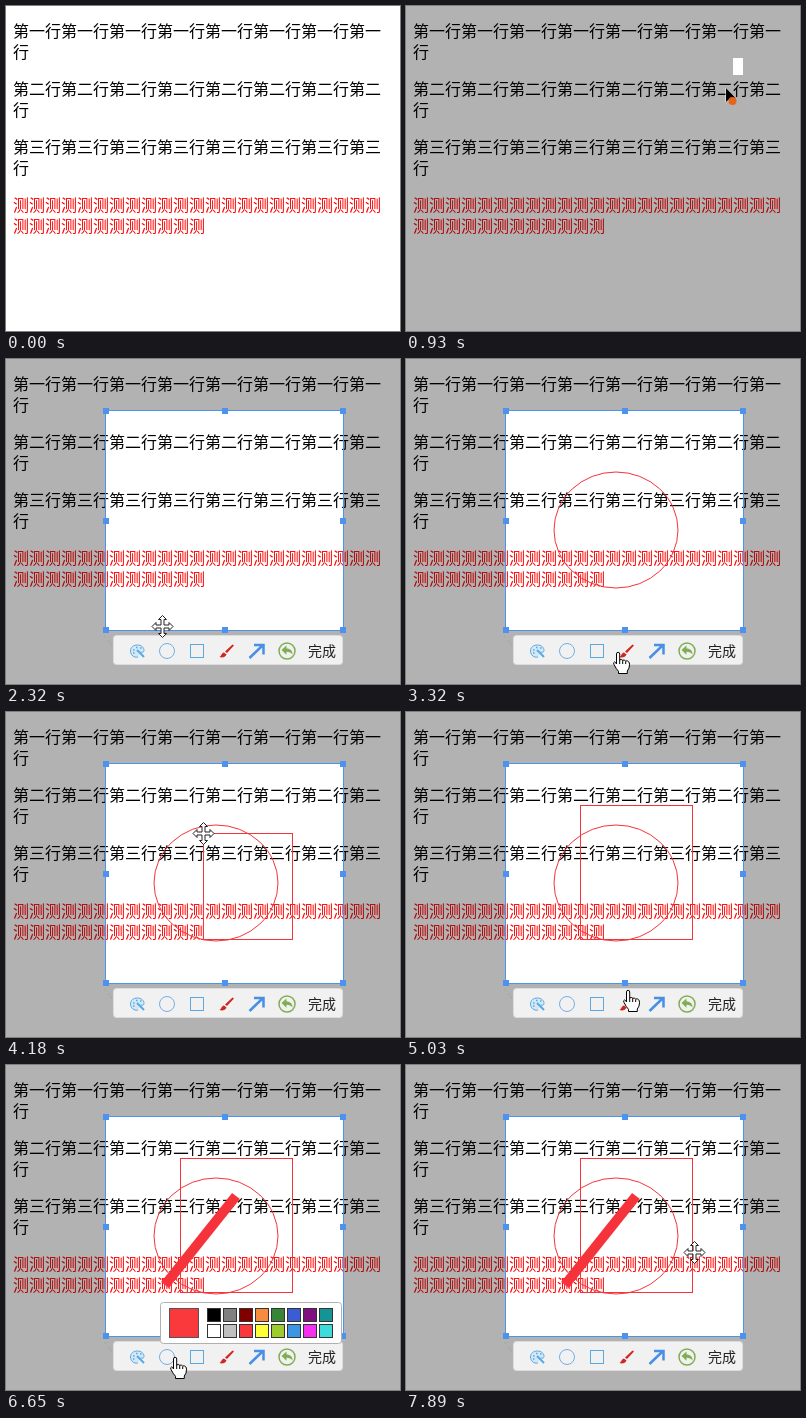
An HTML page for the animation above (7.99 s loop, 394 by 325 pixels).

```html
<!DOCTYPE html>
<html lang="zh-CN">
<head>
<meta charset="utf-8">
<title>Screen capture demo</title>
<style>
html, body { margin: 0; width: 100%; height: 100%; overflow: hidden; background: #fff; }
svg { display: block; width: 394px; height: 325px; }
text { font-family: "Noto Sans CJK SC", "Noto Sans CJK", sans-serif; }
</style>
</head>
<body>
<svg viewBox="0 0 394 325">
  <rect width="394" height="325" fill="#fff"/>
  <g id="page" font-size="16"></g>
  <path id="dim" fill="#000" fill-opacity=".3" fill-rule="evenodd"/>
  <g fill="none" stroke="#f5333a">
    <ellipse id="oval"/>
    <rect id="box"/>
    <line id="brush" stroke-width="10"/>
  </g>
  <g id="frame">
    <rect x="99.5" y="51.5" width="238" height="220" fill="none" stroke="#4d92ee"/>
    <g id="handles" fill="#4d92ee"></g>
  </g>
  <g id="toolbar">
    <path d="M98 277l2 2M103 281v3M106 285l-2 1" stroke="#93b58b" fill="none"/>
    <rect x="107.5" y="276.5" width="229" height="29" rx="3" fill="#f1f1f1" stroke="#dcdcdc"/>
    <g fill="none" stroke="#5aa9e2">
      <path d="M132 298c-4 1-7.500-2-7.500-6s3-6 7-6 6.500 2.500 6.500 5.500c0 2-2 2-3.500 1.500" fill="#d3e8f6"/>
      <path d="M131 291l7 7" stroke-width="2"/>
      <path d="M127 291h1.500M130 288.500h1.500M134 289h1.500M127 294h1.500" stroke-width="1.500"/>
      <circle cx="161" cy="292" r="7.500" stroke="#74aee9"/>
      <rect x="184.500" y="285.500" width="13" height="13"/>
    </g>
    <path d="M226.500 285.500l1.500 1-7 7.500-2-1.500zM218 293.500l2.500 2c-1 2.500-4 3.500-7 2.500 2-1 2-4 4.500-4.500z" fill="#d0261f"/>
    <path d="M243.500 299L256 287M248 286h9.500v9.500" fill="none" stroke="#4a8fe6" stroke-width="2.500"/>
    <circle cx="281" cy="292" r="8" fill="none" stroke="#7fae52" stroke-width="1.500"/>
    <path d="M275.500 291l5-4.500v3c4 0 6 2.500 6 6-1.500-2-3-2.800-6-2.800v3z" fill="#7fae52"/>
    <text x="302" y="297" font-size="14" fill="#222">完成</text>
  </g>
  <g id="popup">
    <rect x="154.500" y="237.500" width="181" height="41" rx="3" fill="#fff" stroke="#b0b0b0"/>
    <rect id="current" x="163.500" y="243.500" width="29" height="29" stroke="#555"/>
    <g id="swatches" stroke="#333"></g>
  </g>
  <g id="arrow">
    <path d="M0 0v14l3.300-3 2.200 5 2.200-1-2.200-4.800h4.500z" fill="#000" stroke="#fff" paint-order="stroke"/>
    <circle cx="6.500" cy="13" r="4" fill="#e8641b"/>
  </g>
  <path id="move" fill="#fff" stroke="#222" stroke-linejoin="round"
    d="M.5-10.500l4 4h-2.500v5.500h5v-2.500l4 4-4 4v-2.500h-5v5.500h2.500l-4 4-4-4h2.500v-5.500h-5v2.500l-4-4 4-4v2.500h5v-5.500h-2.500z"/>
  <g id="hand">
    <path fill="#fff" stroke="#000" stroke-linejoin="round"
      d="M-1.500 12V2q0-1.700 1.600-1.700T1.700 2v6q1.500-1.300 3 .3 1.700-.8 2.800.7 2-.7 3.200.8.800.7.800 3 0 3.700-2.200 6.200v2.500h-8.800v-2.200q-2.300-2.300-4.500-6.800-1-2.200.5-2.500 1-.1 2 2z"/>
    <path d="M1.700 8v4M4.700 8.500V12M7.700 9.500V12" stroke="#000" fill="none"/>
  </g>
</svg>
<script>
const LOOP = 7990, STEP = 77.3, LAG = 17, LAST = 102;
const el = id => document.getElementById(id);

function set(node, attrs) {
  for (const name in attrs) node.setAttribute(name, attrs[name]);
}
function add(parent, tag, attrs, text = "") {
  const node = document.createElementNS("http://www.w3.org/2000/svg", tag);
  node.textContent = text;
  set(node, attrs);
  el(parent).append(node);
}
function show(id, on) {
  el(id).style.display = on ? "" : "none";
}

// Page text, 23 characters to a line
function paragraph(row, text, fill) {
  [text.slice(0, 23), text.slice(23)].forEach((line, i) =>
    add("page", "text", { x: 7, y: 31 + 58 * row + 21 * i, fill }, line));
}
["一", "二", "三"].forEach((n, row) => paragraph(row, `第${n}行`.repeat(8), "#000"));
paragraph(3, "测".repeat(35), "#f00");

for (const i of [0, 1, 2])
  for (const j of [0, 1, 2])
    if (i !== 1 || j !== 1)
      add("handles", "rect", { x: Math.round(97 + 118.5 * i), y: Math.floor(49 + 109.5 * j) + (j === 1), width: 6, height: 6 });

const colors = ("#000 #808080 #800000 #f78b3e #388538 #3a5dd6 #80107f #149494 " +
  "#fff #c0c0c0 #f9393c #ffff38 #9ccc2e #3d95e6 #f52ff0 #3ddbdb").split(" ");
colors.forEach((fill, i) => add("swatches", "rect", {
  x: 201.5 + 16 * (i % 8), y: 243.5 + 16 * (i >> 3), width: 13, height: 13, fill
}));

// What the pointer drags out; start and end count steps
const marks = {
  area: { from: [337, 52], to: [100, 271], start: 10, end: 20 },
  oval: { from: [148, 113], to: [272, 229], start: 34, end: 38 },
  box: { from: [287, 228], to: [174, 93], start: 51, end: 55 },
  brush: { from: [159, 220], to: [230, 131], start: 67, end: 70 }
};
const tool = (i, dx = 0, dy = 0) => [131 + 30 * i + dx, 292 + dy];

// Pointer stops: arrive at a point, rest there until a later step
const stops = [];
const go = (at, point, until = at) => stops.push({ at, point, until });
const press = ({ from, start }, at = start) => go(at, from, start);
const release = ({ to, end }, until = end) => go(end, to, until);

go(1, [313, 306]);
go(3, [301, 186], 4);
press(marks.area, 8);
go(12, [320, 82]);
release(marks.area, 21);
go(27, tool(1, -5), 29);
go(30, [156, 267]);
press(marks.oval, 33);
release(marks.oval);
go(43, [212, 293]);
go(46, tool(2, -3, 4), 47);
press(marks.box, 50);
release(marks.box, 57);
go(63, tool(3), 64);
go(65, [222, 278]);
press(marks.brush);
release(marks.brush, 71);
go(76, tool(4, 7));
go(81, tool(0, -6, 10));
go(83, tool(0), 84);
go(86, tool(1, 8));
go(94, [299, 279]);
go(96, [299, 266], 98);
go(LAST, [288, 187]);

// Glides slow down slightly towards each stop
function pos(k) {
  const i = Math.max(1, stops.findIndex(s => s.at >= k));
  const a = stops[i - 1], b = stops[i];
  const t = Math.min(1, Math.max(0, (k - a.until) / (b.at - a.until)));
  return a.point.map((v, n) => Math.round(v + (b.point[n] - v) * t ** 0.8));
}

// Extent of a mark at step k
function extent({ from, start, end }, k) {
  const [ax, ay] = from, [bx, by] = pos(Math.max(start, Math.min(k, end)));
  return { ax, ay, bx, by, x: Math.min(ax, bx), y: Math.min(ay, by),
    w: Math.abs(bx - ax), h: Math.abs(by - ay) };
}

function drawMarks(k) {
  // The clear area trails the pointer by one step
  const a = extent(marks.area, k - 1);
  const hole = k > marks.area.start ? `M${a.x} ${a.y}h${a.w}v${a.h}h${-a.w}z` : "";
  set(el("dim"), { d: "M0 0H394V325H0z" + hole });

  const o = extent(marks.oval, k);
  set(el("oval"), { cx: o.x + o.w / 2, cy: o.y + o.h / 2, rx: o.w / 2, ry: o.h / 2 });
  const r = extent(marks.box, k);
  set(el("box"), { x: r.x + .5, y: r.y + .5, width: Math.max(0, r.w - 1), height: Math.max(0, r.h - 1) });
  const s = extent(marks.brush, k);
  set(el("brush"), { x1: s.ax, y1: s.ay, x2: s.bx, y2: s.by });
  for (const id of ["oval", "box", "brush"]) show(id, k > marks[id].start);
}

function draw(time) {
  const k = Math.min(LAST, Math.floor((time + LAG) / STEP));
  const selected = k > marks.area.end;
  const open = k >= 84 && k < 99;
  drawMarks(k);
  show("dim", k >= 5);
  show("frame", selected);
  show("toolbar", selected);
  show("popup", open);
  set(el("current"), { fill: colors[k >= 96 ? 14 : 10] });

  const [x, y] = pos(k);
  const overTools = y >= 272 || open && y > 237;
  const kind = !selected ? "arrow" : overTools ? "hand" : "move";
  for (const id of ["arrow", "move", "hand"]) {
    show(id, k > 0 && id === kind);
    set(el(id), { transform: `translate(${x} ${y})` });
  }
}

const begin = performance.now();
function tick() {
  draw((performance.now() - begin) % LOOP);
  requestAnimationFrame(tick);
}
tick();
</script>
</body>
</html>
```
